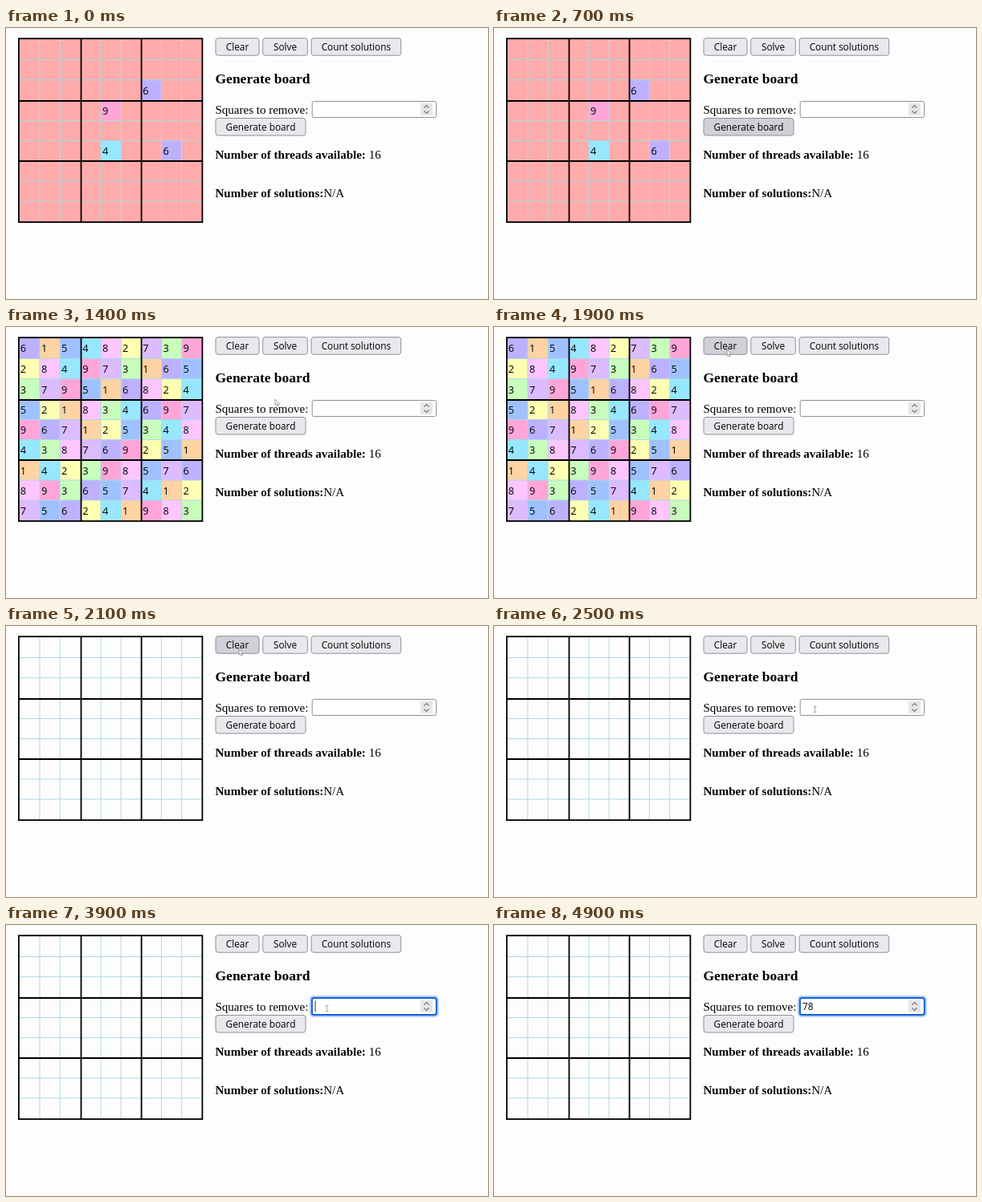
Write an HTML page that moves like this. It is 600x338 px and loops after 5 s.

```html
<!DOCTYPE html>
<html lang="en">
<head>
<meta charset="utf-8">
<title>Sudoku board</title>
<style>
  html, body { margin: 0; height: 100%; overflow: hidden; background: #fdfdfd; }
  svg { display: block; width: 100%; height: 100%; }
  text { font: 15px "Liberation Serif", "Times New Roman", serif; white-space: pre; }
  .b { font-weight: bold; }
  .h { font-size: 17.5px; font-weight: bold; }
  .ui { font: 11.8px "Open Sans", "Noto Sans", sans-serif; }
  .digit { font: 12.8px "Open Sans", "Noto Sans", sans-serif; }
  .ctl { fill: #e9e9ed; stroke: #8f8f9d; }
  .thin { stroke: #add8e6; }
  .thick { stroke: #000; stroke-width: 1.8; fill: none; }
</style>
</head>
<body>
<svg id="stage" viewBox="0 0 600 338">
  <text class="h" x="260.5" y="69">Generate board</text>
  <text x="260.5" y="106.7">Squares to remove:</text>
  <text x="260.5" y="163.3"><tspan class="b">Number of threads available:</tspan> 16</text>
  <text x="260.5" y="210.7"><tspan class="b">Number of solutions:</tspan>N/A</text>
  <rect x="381.2" y="91.5" width="154.3" height="20" rx="2" fill="#fff" stroke="#8f8f9d"/>
  <g id="ring" fill="none">
    <rect x="378.8" y="89" width="159" height="25" rx="4" stroke="#b5cff7" stroke-width="2"/>
    <rect x="380.8" y="91" width="155" height="21" rx="2.5" stroke="#0f62d8" stroke-width="2"/>
  </g>
  <rect x="516" y="94" width="15" height="15" fill="#e6e6e8"/>
  <path d="M520.5 99.5l3-3 3 3M520.5 103.5l3 3 3-3" fill="none" stroke="#77777c" stroke-width="1.1"/>
  <text id="value" class="ui" x="384" y="106"></text>
  <path id="caret" d="M385 94.5v14" stroke="#333"/>
</svg>
<script>
const svg = document.getElementById("stage");
const ring = document.getElementById("ring");
const value = document.getElementById("value");
const caret = document.getElementById("caret");

const xs = [16, 42, 67.2, 93.5, 118, 143.2, 168.6, 193.5, 218.7, 244.2];
const ys = [13.3, 39.5, 64.7, 91, 115.5, 140.6, 166, 191, 216, 242];
const colors = ["#ffabab", "#ffd3a3", "#ffffb3", "#c8fdbc", "#97e7ff",
                "#a0c1ff", "#bdb1ff", "#dcbbff", "#ffc5ff", "#ffa5d8"];

const sparse = "0".repeat(24) + "6" + "0".repeat(6) + "9" +
               "0".repeat(17) + "4006" + "0".repeat(28);
const full = "615482739" + "284973165" + "379516824" +
             "521834697" + "967125348" + "438769251" +
             "142398576" + "893657412" + "756241983";

function add(tag, attrs, text = "") {
  const el = document.createElementNS("http://www.w3.org/2000/svg", tag);
  for (const k in attrs) el.setAttribute(k, attrs[k]);
  el.textContent = text;
  return svg.appendChild(el);
}

const cells = [...full].map((_, i) => {
  const c = i % 9, r = (i - c) / 9;
  return {
    box: add("rect", { x: xs[c], y: ys[r], width: xs[c + 1] - xs[c], height: ys[r + 1] - ys[r] }),
    label: add("text", { class: "digit", x: xs[c] + (c % 3 ? 1.9 : 1.7), y: (ys[r] + ys[r + 1]) / 2 + 5 })
  };
});

function gridLine(i, cls) {
  add("path", { class: cls, d: `M${xs[i]} 13V242.5M16 ${ys[i]}H244.5` });
}
for (const i of [1, 2, 4, 5, 7, 8]) gridLine(i, "thin");
for (const i of [3, 6]) gridLine(i, "thick");
add("rect", { class: "thick", x: 15.9, y: 13.2, width: 228.5, height: 228.9 });

const buttons = [
  ["Clear", 261, 12.7, 54], ["Solve", 319.7, 12.7, 55.6],
  ["Count solutions", 380, 12.7, 111.7], ["Generate board", 261, 112.5, 112]
].map(([name, x, y, w]) => {
  const box = add("rect", { class: "ctl", x, y, width: w, height: 21.5, rx: 3 });
  add("text", { class: "ui", x: x + w / 2, y: y + 15.2, "text-anchor": "middle" }, name);
  return { box, x, y, w };
});

const arrow = add("path", {
  d: "M0 0V7.6L1.8 6 3 8.7 4.2 8.2 3 5.6H5.3Z", fill: "#fff", stroke: "#777", "stroke-width": .7
});
const beam = add("path", {
  d: "M-2-3.5H2M0-3.5V3.5M-2 3.5H2", fill: "none", stroke: "#999", "stroke-width": .8
});

// pointer path: time, x, y
const path = [[100, 460, 22], [600, 340, 122], [1250, 340, 122], [1400, 335, 90],
              [1800, 290, 28.5], [2200, 290, 28.5], [2500, 399.5, 104], [5000, 399.5, 104]];

function pointer(t) {
  const n = Math.max(1, path.findIndex(p => p[0] > t));
  const [t0, x0, y0] = path[n - 1], [t1, x1, y1] = path[n];
  const u = Math.max(0, (t - t0) / (t1 - t0)), e = u * u * (3 - 2 * u);
  return [x0 + (x1 - x0) * e, y0 + (y1 - y0) * e];
}

const show = (el, on) => el.setAttribute("visibility", on ? "visible" : "hidden");

let shown;
function setBoard(board) {
  if (board === shown) return;
  shown = board;
  cells.forEach(({ box, label }, i) => {
    const d = board ? +board[i] : 0;
    box.setAttribute("fill", board ? colors[d] : "none");
    label.textContent = d || "";
  });
}

function draw(now) {
  const t = Math.floor(now % 5000 / 100) * 100;
  setBoard(t < 800 ? sparse : t < 2000 ? full : "");

  const [x, y] = pointer(t);
  for (const b of buttons) {
    const over = t >= 100 && x > b.x && x < b.x + b.w && y > b.y && y < b.y + 21.5;
    b.box.style.fill = over ? "#d0d0d7" : "";
  }
  const visible = t >= 100 && t < 4200 && (t < 700 || t > 1200);
  const inField = t >= 2400 && x > 381 && y > 91;
  for (const el of [arrow, beam]) el.setAttribute("transform", `translate(${x} ${y})`);
  show(arrow, visible && !inField);
  show(beam, visible && inField);

  const focused = t >= 2600;
  const typed = "78".slice(0, t < 4200 ? 0 : t < 4300 ? 1 : 2);
  const lastInput = typed ? 4100 + 100 * typed.length : 2600;
  show(ring, focused);
  show(caret, focused && (t - lastInput) % 1000 < 500);
  caret.setAttribute("transform", `translate(${typed.length * 6.8} 0)`);
  value.textContent = typed;
  requestAnimationFrame(draw);
}
const start = performance.now();
draw(0);
function tick() { }
requestAnimationFrame(tick);
</script>
</body>
</html>
```
